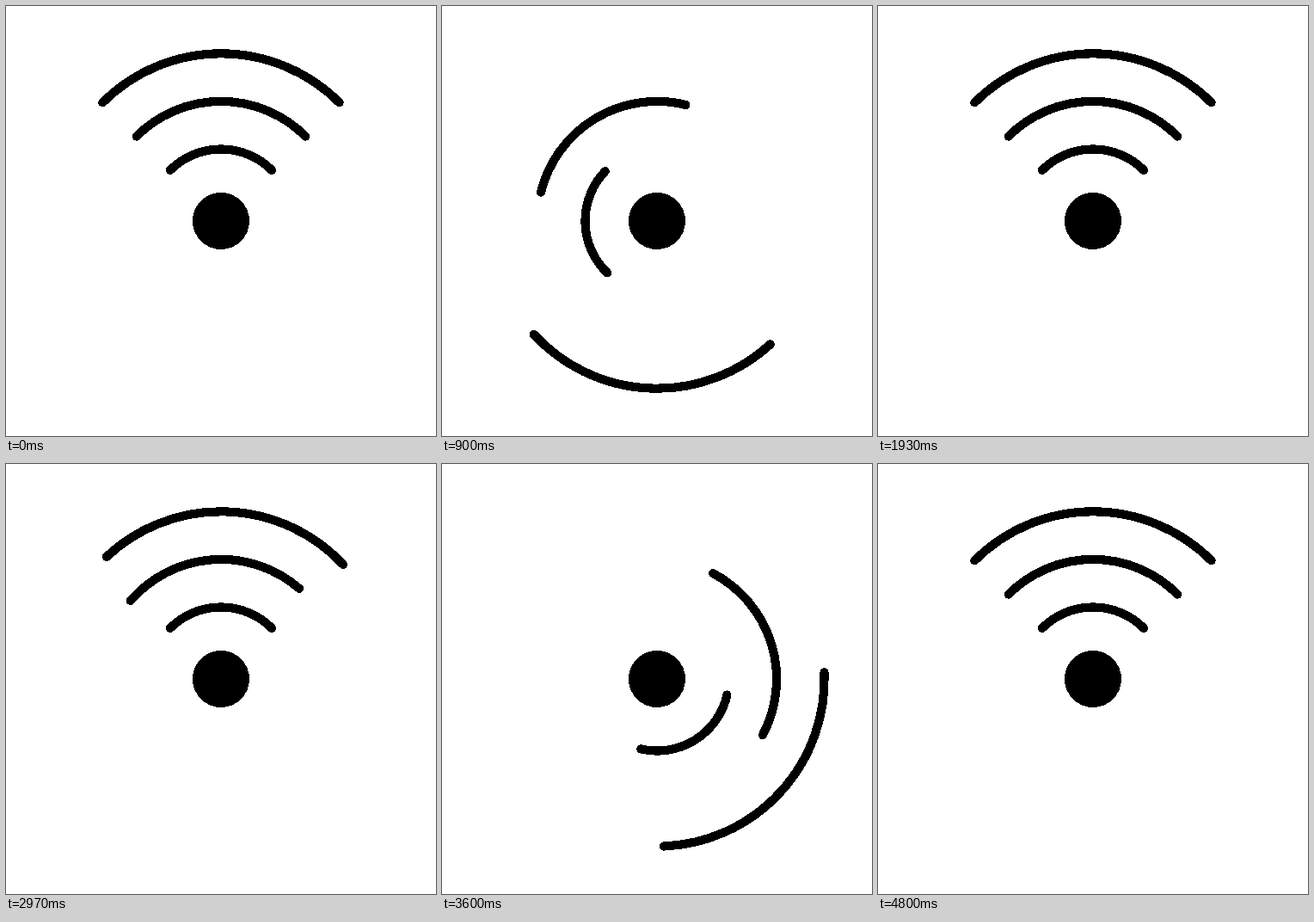
Animation, 500 px wide and 500 px high, one loop 5.73 s. Source, as an HTML page:

```html
<!DOCTYPE html>
<html lang="en">
<head>
<meta charset="utf-8">
<title>Signal loader</title>
<style>
  html, body { margin: 0; height: 100%; overflow: hidden; background: #fff; }
  svg { display: block; width: 100%; height: 100%; shape-rendering: crispEdges; }
  path { fill: none; stroke: #000; stroke-width: 1.83; stroke-linecap: round; }
</style>
</head>
<body>
<svg viewBox="-45 -45 90 90"><circle r="5.95"/></svg>
<script>
  const LOOP = 5730, STEP = 80, CYCLE_STEPS = 36;
  const svg = document.querySelector("svg");

  // Each arc turns by `turn` degrees between `start` and `end` (ms in the cycle).
  const arcs = [
    { radius: 15.04, turn: 720, start: 323, end: 1797 },
    { radius: 25.04, turn: -720, start: 0, end: 1831 },
    { radius: 35.04, turn: 360, start: 0, end: 1920 }
  ];

  for (const arc of arcs) {
    const r = arc.radius, c = r * Math.SQRT1_2;
    arc.path = document.createElementNS(svg.namespaceURI, "path");
    arc.path.setAttribute("d", `M${-c} ${-c}A${r} ${r} 0 0 1 ${c} ${-c}`);
    svg.append(arc.path);
  }

  // Cubic Bezier easing with control points (0.333, 0) and (0.545, 1).
  function ease(x) {
    if (x <= 0 || x >= 1) return x <= 0 ? 0 : 1;
    let low = 0, high = 1;
    for (let i = 0; i < 24; i++) {
      const t = (low + high) / 2, u = 1 - t;
      if (3 * t * u * (u * 0.333 + t * 0.545) + t ** 3 < x) low = t;
      else high = t;
    }
    return low * low * (3 - 2 * low);
  }

  function draw(time) {
    // Poses last 80 ms and appear on a 30 fps grid.
    const tick = Math.floor((time % LOOP + 5) * 30 / 1000);
    const step = Math.floor(tick * 1000 / (30 * STEP)) % CYCLE_STEPS;
    for (const { path, turn, start, end } of arcs) {
      const progress = (step * STEP - start) / (end - start);
      path.setAttribute("transform", `rotate(${turn * ease(progress)})`);
    }
  }

  const begin = performance.now();
  function loop() {
    draw(performance.now() - begin);
    requestAnimationFrame(loop);
  }
  loop();
</script>
</body>
</html>
```
